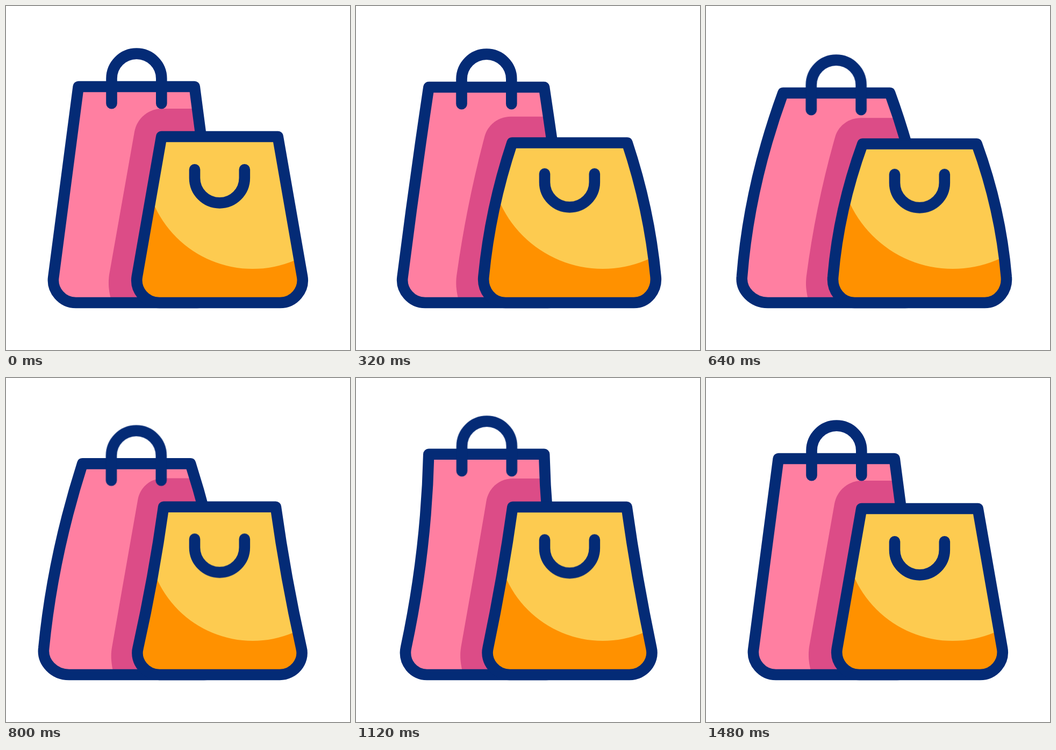
These frames come from a looping animation (640x640 px, 2000 ms). An HTML page without scripts:

```html
<!DOCTYPE html>
<html lang="en">
<head>
<meta charset="utf-8">
<title>Shopping bags</title>
<style>
  html, body { margin: 0; height: 100%; overflow: hidden; background: #fff; }
  svg { display: block; width: 100vw; height: 100vh; }

  .line {
    fill: none;
    stroke: #042b76;
    stroke-width: 20.6;
    stroke-linecap: round;
    stroke-linejoin: round;
  }

  .move {
    animation: 2s cubic-bezier(.6, 0, .4, 1) infinite both;
  }
  /* The back bag follows the front one. */
  .late { animation-delay: .16s; }

  .back { animation-name: back; }
  .back-handle { animation-name: back-handle; }
  .shade { animation-name: shade; }
  .front { animation-name: front; }
  .front-handle { animation-name: front-handle; }
  .glow { animation-name: glow; }

  /* Each cycle: rest, squash, stretch, rest. */
  @keyframes back {
    0%, 2%, 66%, 100% { d: path("M134.7 150H350.7Q373.9 327.3 397.1 504.7C400.3 529 380.9 552 355.4 552H130C104.5 552 85.1 529 88.3 504.7Q111.5 327.3 134.7 150Z"); }
    26% { d: path("M143.3 162H342.1Q405.4 335 418.6 503C421.4 529 398.4 552 370.4 552H115C87 552 64 529 66.8 503Q80 335 143.3 162Z"); }
    46% { d: path("M135.3 141.7H350.1Q354.4 325 392.2 501C398.4 530 377.4 552 353.4 552H132C108 552 87 530 93.2 501Q131 325 135.3 141.7Z"); }
  }
  @keyframes back-handle {
    0%, 2%, 66%, 100% { transform: translate(0, 0); }
    26% { transform: translate(-.7px, 12px); }
    46% { transform: translate(.5px, -8.3px); }
  }
  @keyframes shade {
    0%, 2%, 66%, 100% { d: path("M400 191H290C265 191 243.5 209 239 234Q215.5 367 192 500C190 515 190.5 530 197 552H400Z"); }
    26% { d: path("M400 212H287C265 212 246 226 239.5 246Q201 372 185 503C183.5 517 184 530 190 552H400Z"); }
    46% { d: path("M400 183H294C270 183 250 199 246 224Q224 362 199 500C196 515 197 530 202 552H400Z"); }
  }
  @keyframes front {
    0%, 2%, 66%, 100% { d: path("M289.3 243H505.7Q528.4 373 551.1 503C555.5 528.5 535.7 552 509.7 552H285.3C259.3 552 239.5 528.5 243.9 503Q266.6 373 289.3 243Z"); }
    26% { d: path("M291 259.4H504Q553 380 560.3 503C562.5 529 545 552 520 552H275C250 552 232.5 529 234.7 503Q242 380 291 259.4Z"); }
    46% { d: path("M293.5 237H501.5Q515.4 370 547.8 502C555 528 533 552 508 552H287C262 552 240 528 247.2 502Q279.6 370 293.5 237Z"); }
  }
  @keyframes front-handle {
    0%, 2%, 66%, 100% { transform: translate(0, 0); }
    26% { transform: translate(0, 11.2px); }
    46% { transform: translate(0, -7px); }
  }
  @keyframes glow {
    0%, 2%, 66%, 100% { r: 201px; cy: 288px; }
    26% { r: 214px; cy: 275px; }
    46% { r: 193px; cy: 296px; }
  }
</style>
</head>
<body>
<svg viewBox="0 0 640 640">
  <clipPath id="in-back"><path class="move late back"/></clipPath>
  <clipPath id="in-front"><path class="move front"/></clipPath>

  <g clip-path="url(#in-back)">
    <rect width="640" height="640" fill="#ff7fa1"/>
    <path class="move shade" fill="#dc4c87"/>
  </g>
  <path class="line move late back"/>
  <path class="line move late back-handle" d="M196.5 181.2V135a46.4 46.4 0 0 1 92.8 0V181.2"/>

  <g clip-path="url(#in-front)">
    <rect width="640" height="640" fill="#ff9100"/>
    <circle class="move glow" cx="459" fill="#fdcb50"/>
  </g>
  <path class="line move front"/>
  <path class="line move front-handle" d="M351 304.3V320a46.4 46.4 0 0 0 92.8 0V304.3"/>
</svg>
</body>
</html>
```
